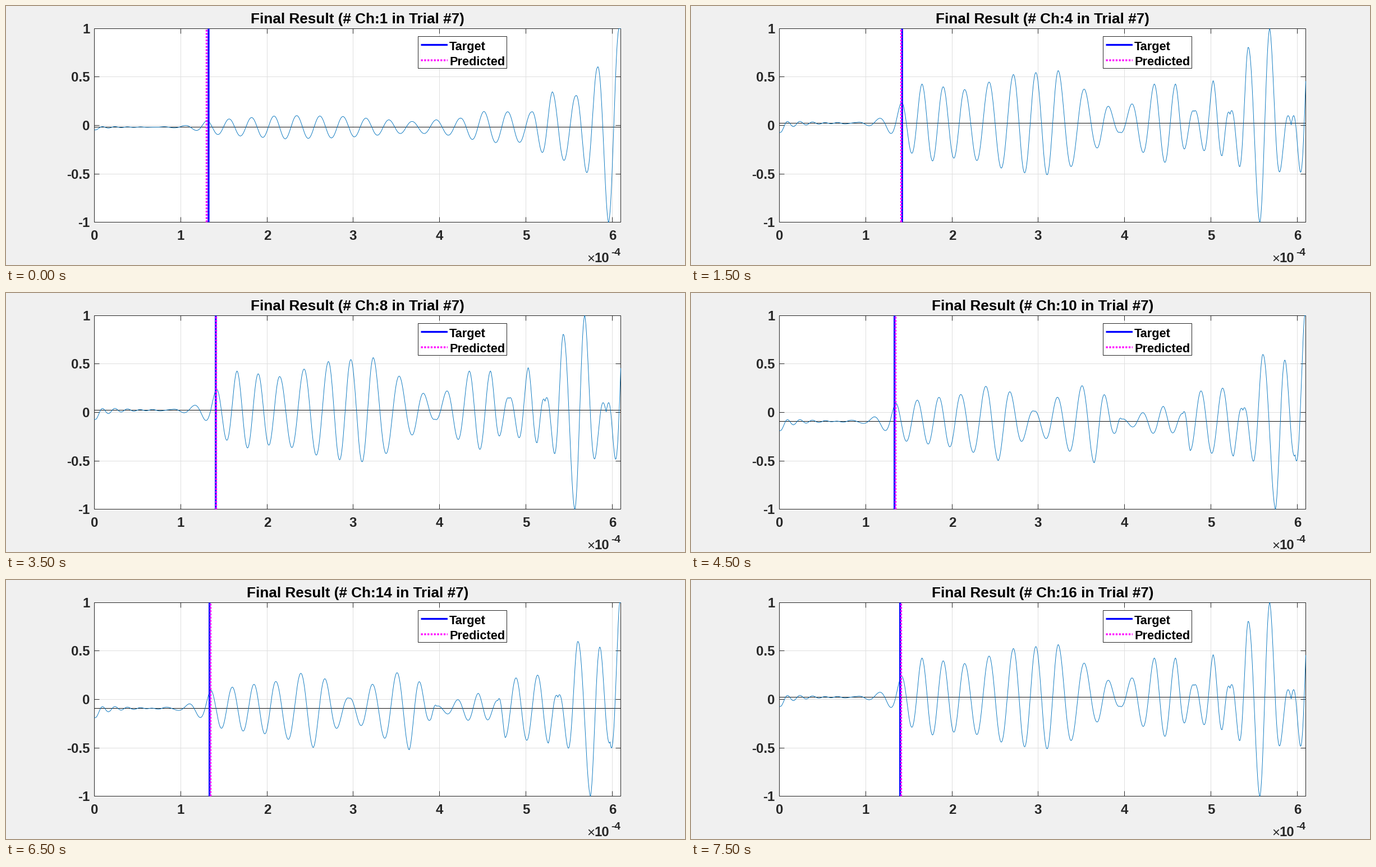
Animation, 1210 px wide and 463 px high, one loop 8000 ms. Source, as a matplotlib script:

```python
import numpy as np
import matplotlib.pyplot as plt
from matplotlib.animation import FuncAnimation
from matplotlib.patches import Rectangle

W, H, DPI = 1210, 463, 64
PT = 72 / DPI  # points per pixel
LEFT, RIGHT, TOP, BOTTOM = 157, 1095, 40, 386
INK, GRID, BLUE, MAGENTA, TRACE = "#262626", "#dfdfdf", "#0000ff", "#ff00ff", "#0072bd"
LEGEND_SHIFT = 259

# Four sensors: mean level, strength of the opening ripple, legend at the
# bottom or not, and (position, amplitude) keys set on crests or troughs.
# The first key is the crest of the arriving pulse.
SENSORS = [
    (216, 0.3, False, [
        (357, 12), (497, 21), (600, 19), (723, 10), (809, 16), (851, 28),
        (936, 27), (973, 63), (1015, 56), (1053, 106), (1073, 170),
        (1092, 176)]),
    (229, 1, False, [
        (364, 33), (480, 48), (547, 70), (611, 18), (652, 43), (718, 74),
        (756, 20), (767, 4), (841, 27), (876, 14), (889, 52), (966, 62),
        (983, 20), (1018, 119), (1041, 157), (1076, 60), (1093, 189)]),
    (197, 1, True, [
        (367.5, 34), (482, 60), (550, 72), (628, 41), (696, 106), (754, 42),
        (774, 12), (803, 8), (826, 28), (851, 62), (928, 22), (991, 106),
        (1027, 42), (1061, 157), (1082, 189), (1103, 150)]),
    (209, 1, False, [
        (374, 37), (411, 70), (487, 60), (574, 87), (654, 94), (724, 44),
        (764, 16), (825, 70), (863, 70), (896, 21), (930, 76), (946, 58),
        (960, 16), (992, 135), (1013, 177), (1031, 169), (1069, -3),
        (1100, 170)]),
]


def signal(mean, ripple, keys):
    """Fading ripple, then a pulse whose period and strength follow the keys."""
    x = np.arange(LEFT, RIGHT + 0.5, 0.5)
    kx, ka = np.array(keys, float).T
    # A half swing is about 20 px, so the gaps tell how many lie between keys.
    halves = np.concatenate([[0], np.cumsum(np.round(np.diff(kx) / 20.2))])
    before = np.minimum(x - kx[0], 0)
    phase = np.pi * (np.interp(x, kx, halves) + before / 19.5)
    pulse = np.interp(x, kx, ka) * np.exp(before / 27) * np.cos(phase)
    u = x - 160
    opening = -8 * np.exp(-u / 12) - 8 * np.exp(-u / 45) * np.cos(2 * np.pi * u / 22.5)
    return x, np.clip(mean - pulse - ripple * opening, TOP, BOTTOM)


plt.rcParams["path.snap"] = False
fig = plt.figure(figsize=(W / DPI, H / DPI), dpi=DPI, facecolor="#f0f0f0")
ax = fig.add_axes([0, 0, 1, 1])
ax.set_xlim(-0.5, W - 0.5)  # whole numbers fall on pixel centres
ax.set_ylim(H - 0.5, -0.5)
ax.axis("off")


def line(xs, ys, color=INK, width=1.0, z=3, **kw):
    kw.setdefault("solid_capstyle", "butt")
    return ax.plot(xs, ys, color=color, lw=width * PT, zorder=z, **kw)[0]


def label(x, y, text, size, color=INK, ha="left", weight="bold", z=2):
    return ax.text(x, y, text, fontsize=size * PT, color=color, ha=ha,
                   va="baseline", family="Liberation Sans", weight=weight,
                   zorder=z)


def box(x, y, w, h, z, fill, edge=INK):
    return ax.add_patch(Rectangle((x, y), w, h, fc=fill, ec=edge, lw=PT,
                                  zorder=z))


DOTS = dict(linestyle=(0, (1, 0.75)), dash_capstyle="butt")

# Axes, grid and ticks
box(LEFT, TOP, RIGHT - LEFT, BOTTOM - TOP, 0, "white", "none")
box(LEFT, TOP, RIGHT - LEFT, BOTTOM - TOP, 2.5, "none")
for i in range(7):
    x = round(LEFT + i * 153.8)
    label(x, 418, str(i), 24, ha="center")
    if i:
        line([x, x], [TOP, BOTTOM], GRID, z=1)
        for edge, inner in ((TOP, TOP + 9), (BOTTOM, BOTTOM - 9)):
            line([x, x], [edge, inner])
for i, text in enumerate(["1", "0.5", "0", "-0.5", "-1"]):
    y = round(TOP + i * 86.5)
    label(149, y + 8.5, text, 24, ha="right")
    if 0 < i < 4:
        line([LEFT, RIGHT], [y, y], GRID, z=1)
        for edge, inner in ((LEFT, LEFT + 9), (RIGHT, RIGHT - 9)):
            line([edge, inner], [y, y])
label(1034.5, 458, "\u00d7", 24, weight="normal")
label(1048.5, 457, "10", 24)
label(1077.5, 445, "-4", 19)
title = label(626, 30, "", 26.15, "black", "center")

# Moving parts
mean_line = line([LEFT, RIGHT], [0, 0], "#101010")
trace = line([], [], TRACE, 0.9, 4)
target = line([0, 0], [BOTTOM, TOP], BLUE, 3.3, 5)
predicted = line([0, 0], [BOTTOM, TOP], MAGENTA, 3.3, 6, **DOTS)

# Legend
frame = box(734, 54, 158, 57, 7, "white")
rows = []
for y, name, color, style in ((69, "Target", BLUE, {}),
                              (96.5, "Predicted", MAGENTA, DOTS)):
    key = line([739, 786.5], [y, y], color, 3.3, 8, **style)
    rows.append((y, key, label(789.5, y + 9, name, 21.8, "black", z=8)))

curves = [signal(mean, ripple, keys) for mean, ripple, _, keys in SENSORS]


def update(i):
    mean, _, low, keys = SENSORS[i % 4]
    arrival = keys[0][0]
    lag = max(3.5 - 0.6 * i, -1.8)
    shift = LEGEND_SHIFT if low else 0
    title.set_text(f"Final Result (# Ch:{i + 1} in Trial #7)")
    trace.set_data(*curves[i % 4])
    mean_line.set_ydata([mean, mean])
    target.set_xdata([arrival + lag] * 2)
    predicted.set_xdata([arrival] * 2)
    frame.set_y(54 + shift)
    for y, key, name in rows:
        key.set_ydata([y + shift] * 2)
        name.set_y(y + 9 + shift)


anim = FuncAnimation(fig, update, frames=16, interval=500, repeat=True,
                     repeat_delay=0, blit=False)
plt.show()
```
